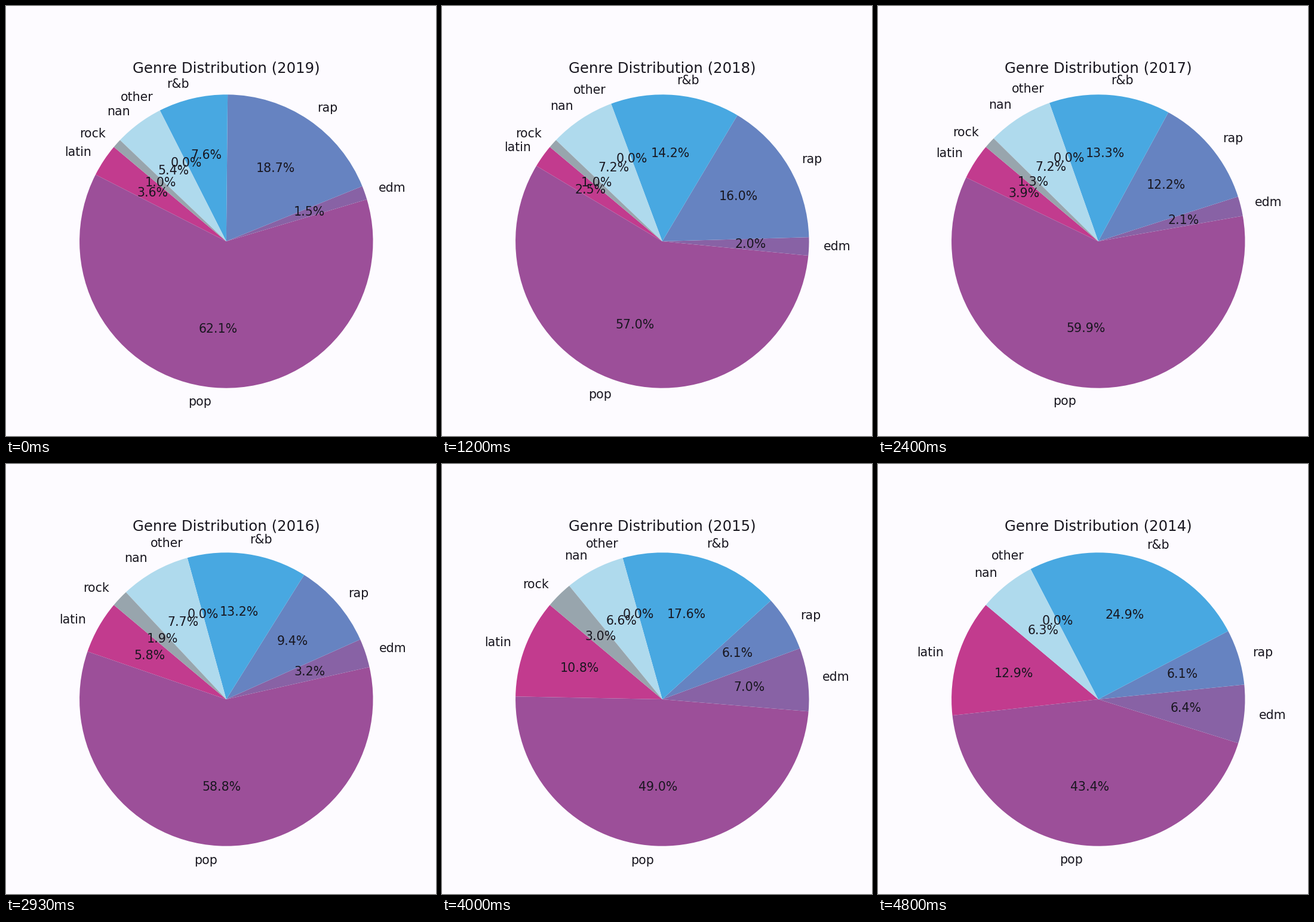
Animation of 720x720 px, one loop 4.93 s. Source, as a matplotlib script:

```python
import math

import matplotlib.pyplot as plt
from matplotlib.animation import FuncAnimation
from matplotlib.patches import Wedge

SIZE = 720
CX, CY, R = 368.8, 326, 245.7
START = 140
TICK, LOOP = 10, 4930
INK = "#18161f"

COLORS = {
    "latin": "#c23b8e",
    "pop": "#9c4f99",
    "edm": "#8862a5",
    "rap": "#6683c1",
    "r&b": "#48a8e1",
    "other": "#d9d9e6",
    "nan": "#afdaed",
    "rock": "#98a5ad",
}

fig = plt.figure(figsize=(SIZE / 72, SIZE / 72), dpi=72, facecolor="#fdfbff")
ax = fig.add_axes([0, 0, 1, 1])
ax.set(xlim=(0, SIZE), ylim=(0, SIZE))
ax.axis("off")


def add_text(size, s="", **kw):
    return ax.text(CX, CY, s, fontsize=size, color=INK,
                   family="DejaVu Sans", **kw)


def add_slice(genre, color):
    wedge = ax.add_patch(Wedge((CX, CY), R, 0, 1, facecolor=color, linewidth=0))
    name = add_text(20.5, genre, va="center")
    value = add_text(20.5, va="center", ha="center")
    return wedge, name, value


slices = {g: add_slice(g, c) for g, c in COLORS.items()}
title = add_text(24.4, ha="center")
title.set_position((CX, SIZE - 111.5))


def ramp(step, start, end, amount):
    """Cosine ease from 0 to amount between two steps."""
    u = min(max((step - start) / (end - start), 0), 1)
    return amount * (1 - math.cos(math.pi * u)) / 2


def shares_at(step):
    """Percent per genre; pop takes whatever the others leave."""
    def track(base, *ramps):
        return base + sum(ramp(step, *r) for r in ramps)

    shares = {
        "latin": track(3.6, (5.5, 12, -1.08), (12, 19, .24), (16.5, 50.35, 10.23)),
        "pop": 0,
        "edm": track(1.52, (0, 7, .48), (12, 19, -.86), (19, 29, 2.02),
                     (29, 40, 3.8), (40, 48, -.53)),
        "rap": track(18.72, (0, 7, -2.72), (12, 40, -9.9)),
        "r&b": track(7.62, (0, 15.7, 7.6), (12, 19, .31), (19, 25, -2.36),
                     (29.6, 64, 21.2)),
        "other": 0,
        "nan": track(5.42, (5, 12, 1.8), (12, 19, -.48), (19, 29, .97),
                     (29, 45, -1.45)),
        "rock": track(1, (19, 40, 1.96), (40, 48, -2.96)),
    }
    shares["pop"] = 100 - sum(shares.values())
    return shares


def step_at(ms):
    """Steps last 130 ms and 70 ms in turn."""
    pairs, rest = divmod(ms, 200)
    return 2 * pairs + (rest >= 130)


def polar(angle, radius):
    a = math.radians(angle)
    return CX + radius * math.cos(a), CY + radius * math.sin(a)


def update(i):
    step = step_at(i * TICK)
    begin = START
    for genre, share in shares_at(step).items():
        wedge, name, value = slices[genre]
        end = begin + 3.6 * share
        mid = (begin + end) / 2
        wedge.set_theta1(begin)
        wedge.set_theta2(end)
        x, y = polar(mid, 1.1 * R)
        name.set_position((x, y))
        name.set_ha("left" if x > CX else "right")
        value.set_position(polar(mid, 0.6 * R))
        value.set_text(f"{share:.1f}%")
        if genre == "rock":
            for part in slices[genre]:
                part.set_visible(share > 0.05)
        begin = end

    title.set_text(f"Genre Distribution ({2019 - (step + 4) // 10})")
    return []


anim = FuncAnimation(fig, update, frames=LOOP // TICK, interval=TICK,
                     init_func=lambda: update(0), repeat=True,
                     repeat_delay=0, cache_frame_data=False)
plt.show()
```
